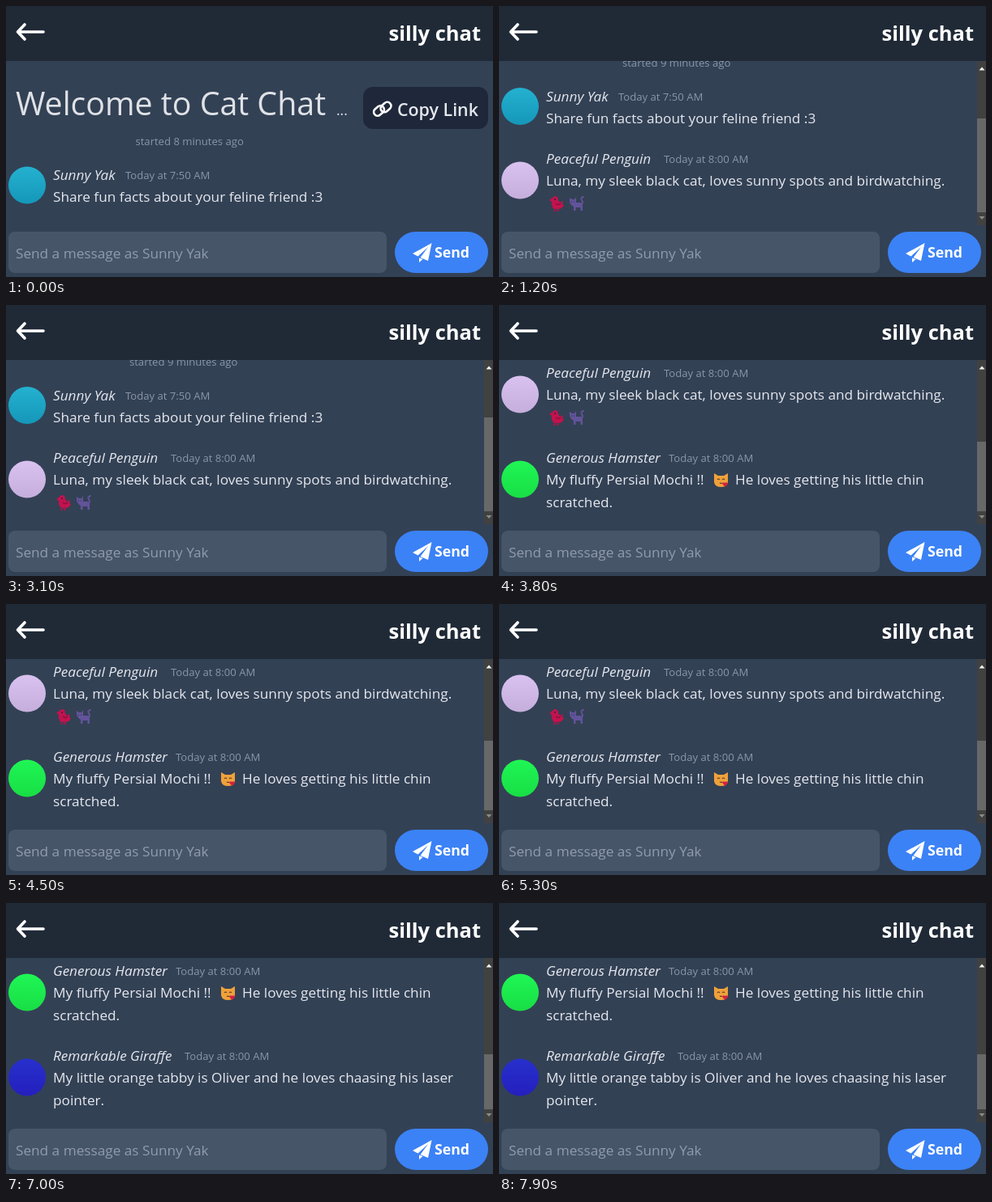
Recreate the animation shown at these times as an HTML page. Size 600x335 px, loop 8 s.

```html
<!DOCTYPE html>
<html lang="en">
<head>
<meta charset="utf-8">
<title>Chat</title>
<style>
  html, body { margin: 0; width: 100%; height: 100%; overflow: hidden; background: #334155; }
  svg { display: block; width: 600px; height: 335px; font: 17.2px "Open Sans", "Noto Sans", sans-serif; fill: #e5e8ee; }
  .name { font-style: italic; }
  .dim { font-size: 13.1px; fill: #8a96a8; }
  .title { font-size: 39.3px; fill: #dfe2e6; }
  .bold { font-weight: 700; fill: #fff; }
  .icon { fill: none; stroke: #fff; stroke-linecap: round; stroke-linejoin: round; }
</style>
</head>
<body>
<svg viewBox="0 0 600 335">
  <defs>
    <clipPath id="pane"><rect y="68" width="600" height="203"/></clipPath>
    <g id="bird">
      <path d="M1 6 5 3Q6 1 9 1 12 2 12 6L14 9 18 7 17 11 19 12Q17 17 12 17H7Q3 14 4 8Z" fill="#c2134e"/>
      <path d="M8 16v3h-2M12 16v3h-2" fill="none" stroke="#b3134a" stroke-width="1.3"/>
      <path d="M9 10Q12 13 15 10" fill="none" stroke="#8c0f3c" stroke-width="1.2"/>
      <circle cx="8" cy="5" r=".9" fill="#2b2030"/>
    </g>
    <g id="cat">
      <path d="M1 3 4 5H7L9 2 9 9H14Q17 9 17 13V19H14.500V15H8.500V19H6V14Q1 11 1 7Z" fill="#62539a"/>
      <path d="M16 11Q18 9 16 6T18 2" fill="none" stroke="#62539a" stroke-width="1.9" stroke-linecap="round"/>
      <path d="M3 8h1M6 8h1" stroke="#2c2948" stroke-width="1.2"/>
    </g>
    <g id="kiss">
      <path d="M1 1 6 4H13L18 1V12Q17 18 9.500 18T1 12Z" fill="#efa13a"/>
      <path d="M5 9q1.500-2 3 0M11 9q1.500-2 3 0M8 13q2 1 3 0" fill="none" stroke="#5b3a2a" stroke-width="1.2"/>
      <path d="M14.500 18 11 14q1-3 3.500-1 2.500-2 3.500 1Z" fill="#d81f3f"/>
    </g>
  </defs>
  <rect width="600" height="335" fill="#334155"/>
  <g id="scenes" clip-path="url(#pane)"></g>

  <rect width="600" height="68" fill="#202a37"/>
  <path class="icon" d="M46 32H15M23 23 14.500 32 23 41" stroke-width="3.6"/>
  <text class="bold" x="585" y="43" text-anchor="end" font-size="25.5">silly chat</text>

  <rect x="3" y="279" width="466" height="51" rx="8" fill="#475569"/>
  <text x="12" y="312" fill="#909cad">Send a message as Sunny Yak</text>
  <rect x="479" y="279" width="115" height="51" rx="25.500" fill="#3b82f6"/>
  <path d="M524.500 293 501 306 507.500 309.500 520 298 510.500 311 520 315ZM509 311.500V317L513.500 313Z" fill="#fff"/>
  <text class="bold" x="528" y="311" font-size="17.7">Send</text>
</svg>
<script>
const LOOP = 8000;
const STARTS = [0, 1200, 3800, 6200];

const text = (x, y, str, cls = "") => `<text class="${cls}" x="${x}" y="${y}">${str}</text>`;
const emoji = (id, x, y) => `<use href="#${id}" x="${x}" y="${y}"/>`;

const people = [
  { name: "Sunny Yak", time: "7:50", timeX: 147, top: "#24b1d0", bottom: "#1597b9", drop: 6.5,
    body: y => text(58, y, "Share fun facts about your feline friend :3") },
  { name: "Peaceful Penguin", time: "8:00", timeX: 203, top: "#d9c2ef", bottom: "#c5aedb", drop: 20.5,
    body: y => text(58, y, "Luna, my sleek black cat, loves sunny spots and birdwatching.") +
      emoji("bird", 61, y + 12) + emoji("cat", 86, y + 12) },
  { name: "Generous Hamster", time: "8:00", timeX: 209, top: "#1ff655", bottom: "#18de45", drop: 20.5,
    body: y => text(58, y, "My fluffy Persial Mochi !!") + emoji("kiss", 264, y - 15) +
      text(291, y, "He loves getting his little chin") + text(58, y + 28, "scratched.") },
  { name: "Remarkable Giraffe", time: "8:00", timeX: 220, top: "#2730cc", bottom: "#241fbe", drop: 20.5,
    body: y => text(58, y, "My little orange tabby is Oliver and he loves chaasing his laser") +
      text(58, y + 28, "pointer.") }
];

function message(i, y) {
  const p = people[i];
  return `<circle cx="26" cy="${y + p.drop}" r="23" fill="url(#skin${i})"/>` +
    text(58, y, p.name, "name") +
    text(p.timeX, y - 1, `Today at ${p.time} AM`, "dim") +
    p.body(y + 27);
}

const scrollbar = thumbY => `
  <rect x="589" y="68" width="11" height="203" fill="#424142"/>
  <rect x="589" y="${thumbY}" width="11" height="${255 - thumbY}" fill="#686868"/>
  <path d="M591.500 79.500 595 75.500 598.500 79.500Z" fill="#f4f4f4"/>
  <path d="M591.500 260 595 264 598.500 260Z" fill="#8b8b8b"/>`;

const welcome = text(12, 135, "Welcome to Cat Chat", "title") + text(407, 135, "...") + `
  <rect x="440" y="100" width="154" height="52" rx="12" fill="#1f283a"/>
  <g class="icon" stroke-width="2.6">
    <rect x="-7" y="-4.700" width="14" height="9.400" rx="4.700" transform="translate(459.500 129.500) rotate(-42)"/>
    <rect x="-7" y="-4.700" width="14" height="9.400" rx="4.700" transform="translate(468 125) rotate(-42)"/>
  </g>
  <text x="482" y="135.500" font-size="21.4" font-weight="600">Copy Link</text>` +
  text(159.5, 172, "started 8 minutes ago", "dim");

const scenes = [
  welcome + message(0, 215),
  text(152, 75, "started 9 minutes ago", "dim") + message(0, 117.5) + message(1, 195) + scrollbar(139),
  message(1, 90) + message(2, 195) + scrollbar(169),
  message(2, 90) + message(3, 195) + scrollbar(187)
];

document.querySelector("defs").insertAdjacentHTML("beforeend", people.map((p, i) =>
  `<linearGradient id="skin${i}" x2="0" y2="1"><stop stop-color="${p.top}"/><stop offset="1" stop-color="${p.bottom}"/></linearGradient>`
).join(""));
const holder = document.getElementById("scenes");
holder.innerHTML = scenes.map(s => `<g>${s}</g>`).join("");

function draw() {
  const t = performance.now() % LOOP;
  const now = STARTS.filter(s => s <= t).length - 1;
  [...holder.children].forEach((g, i) => g.style.display = i === now ? "" : "none");
  requestAnimationFrame(draw);
}
draw();
</script>
</body>
</html>
```
